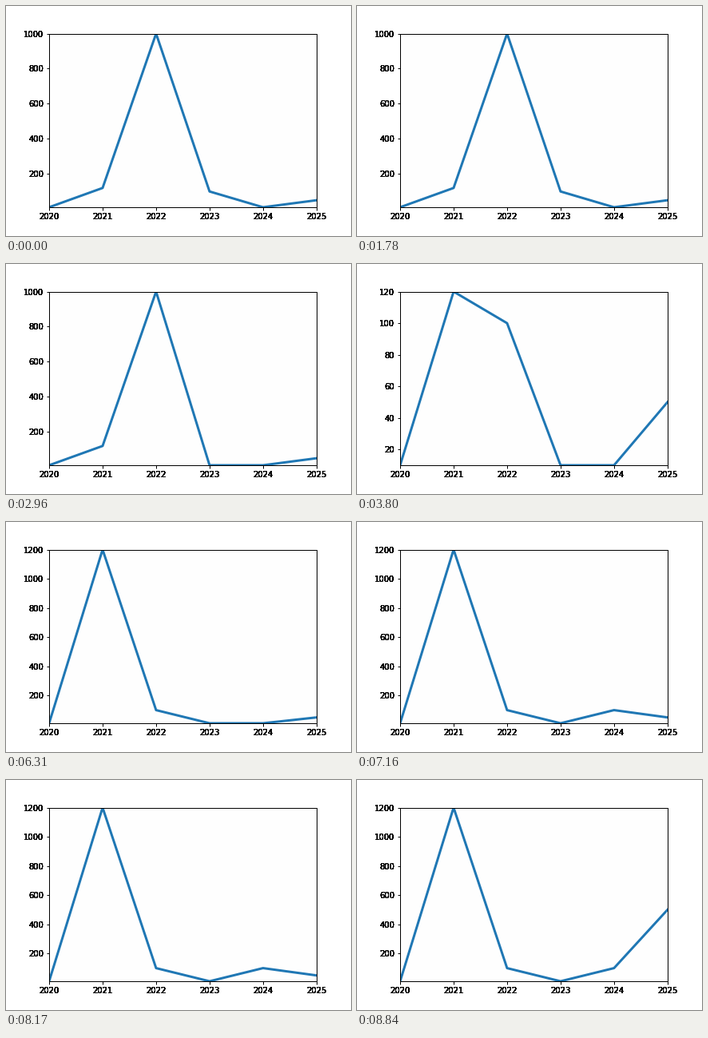
Recreate the animation shown at these times as a matplotlib script. Size 432x288 px, loop 10000 ms.

```python
import matplotlib.pyplot as plt
import numpy as np
from matplotlib.animation import FuncAnimation
from matplotlib.axes import Axes

STEP_MS, LOOP_MS = 40, 10000
YEARS = np.arange(2020, 2026)
START = [10, 120, 1000, 100, 10, 50]
# (time in ms, year, new value)
EDITS = [
    (2960, 2023, 10),
    (3800, 2022, 100),
    (5040, 2021, 1200),
    (7160, 2024, 100),
    (8840, 2025, 500),
]

plt.rcParams.update({"font.family": "DejaVu Sans", "font.size": 10})


class HeavyLabelAxes(Axes):
    """Axes whose tick labels are overdrawn until their edges turn solid."""

    passes = 9

    def draw(self, renderer):
        super().draw(renderer)
        for axis in (self.xaxis, self.yaxis):
            for label in axis.get_majorticklabels():
                for _ in range(self.passes):
                    label.draw(renderer)


def values_at(ms):
    values = np.array(START)
    for when, year, value in EDITS:
        if ms >= when:
            values[year - YEARS[0]] = value
    return values


fig = plt.figure(figsize=(6, 4), dpi=72, facecolor="white")
ax = fig.add_axes(HeavyLabelAxes(fig, [0.125, 0.125, 0.775, 0.755], facecolor="#fefefe"))
ax.tick_params(width=1)
for spine in ax.spines.values():
    spine.set_linewidth(1)
ax.set_xticks(YEARS)
ax.set_xlim(YEARS[0], YEARS[-1])
line, = ax.plot(YEARS, START, color="#1f77b4", lw=3)


def update(i):
    values = values_at(i * STEP_MS)
    low, high = values.min(), values.max()
    step = 200 if high > 500 else 20
    line.set_ydata(values)
    ax.set_yticks(np.arange(step, high + 1, step))
    ax.set_ylim(low, high)
    return (line,)


anim = FuncAnimation(fig, update, frames=LOOP_MS // STEP_MS, interval=STEP_MS,
                     repeat=True, repeat_delay=0, blit=False)
plt.show()
```
